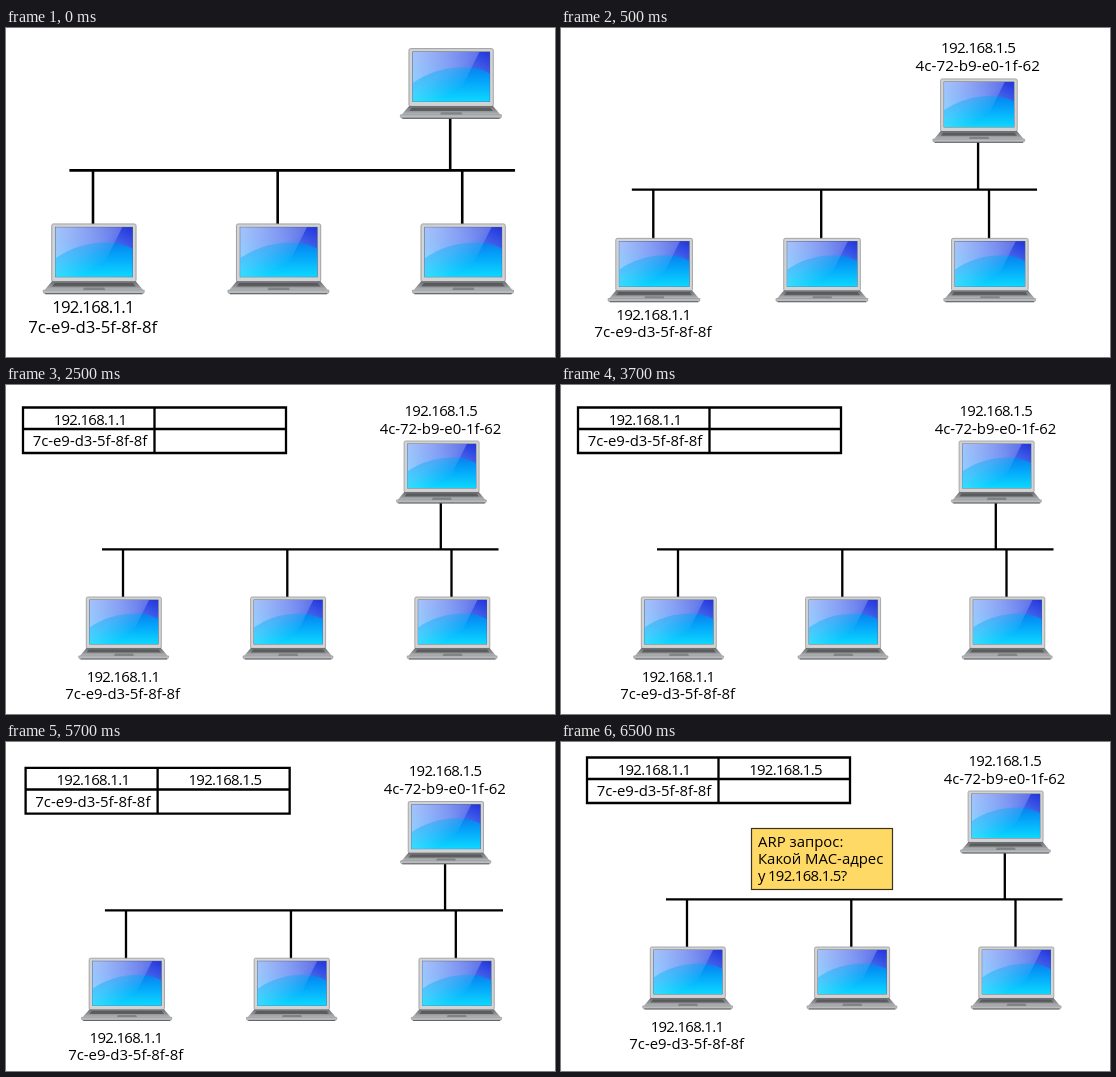
Recreate the animation shown at these times as an HTML page. Size 549 px wide and 329 px high, loop 8000 ms.

```html
<!DOCTYPE html>
<html lang="ru">
<head>
<meta charset="utf-8">
<title>ARP</title>
<style>
  html, body { margin: 0; width: 100%; height: 100%; overflow: hidden; background: #fff; }
  svg { display: block; width: 549px; height: 329px; }
  text { font: 14.9px "Open Sans", "Noto Sans", sans-serif; fill: #000; }
  .mid text { text-anchor: middle; }
  .ip { letter-spacing: -.045em; }
  .wire { fill: none; stroke: #000; stroke-width: 2.3; }
</style>
</head>
<body>
<svg viewBox="0 0 549 329">
  <defs>
    <linearGradient id="sky" x1="1" y1="0" x2=".3" y2=".8">
      <stop offset="0" stop-color="#2434dc"/>
      <stop offset=".45" stop-color="#4a70ee"/>
      <stop offset="1" stop-color="#5cb4ff"/>
    </linearGradient>
    <linearGradient id="sea" x1="0" y1="0" x2="0" y2="1">
      <stop offset="0" stop-color="#0a80ee"/>
      <stop offset=".4" stop-color="#04a4fa"/>
      <stop offset="1" stop-color="#0cd8ff"/>
    </linearGradient>
    <linearGradient id="shine" x1="0" y1="0" x2=".8" y2="1">
      <stop offset="0" stop-color="#fff" stop-opacity=".5"/>
      <stop offset=".5" stop-color="#fff" stop-opacity=".25"/>
      <stop offset=".8" stop-color="#fff" stop-opacity="0"/>
    </linearGradient>
    <linearGradient id="deck" x1="0" y1="0" x2="0" y2="1">
      <stop offset="0" stop-color="#6a6c6e"/>
      <stop offset=".5" stop-color="#8e9092"/>
      <stop offset="1" stop-color="#bfc0c2"/>
    </linearGradient>
    <!-- origin: top of the lid, on the cable -->
    <g id="laptop">
      <rect x="-36.7" y=".4" width="75" height="51.4" rx="1.5" fill="#d2d3d5" stroke="#96989b" stroke-width=".8"/>
      <rect x="-33.7" y="3" width="69.2" height="44.8" fill="#4c5868"/>
      <rect x="-33.3" y="3.4" width="68.4" height="44" fill="url(#sky)"/>
      <path d="M-33.3 31C-21 22 -4 17 11 17C21 17 29 19 35.1 22.5V47.4H-33.3Z" fill="url(#sea)"/>
      <path d="M-33.3 3.4H26L4 47.4H-33.3Z" fill="url(#shine)"/>
      <path d="M-36.5 51.4H38L45.2 59.8H-43.7Z" fill="url(#deck)"/>
      <path d="M-34 53H35.5L38 56H-36.5Z" fill="#4c4e50" opacity=".75"/>
      <path d="M-8 57H10L11 59.3H-9Z" fill="#808284"/>
      <path d="M-44.3 59.3H45.6V61Q45.6 62.4 43.5 62.4H-42Q-44.3 62.4-44.3 61Z" fill="#b9bbbd" stroke="#85878a" stroke-width=".5"/>
      <path d="M-42.5 62.4H44" stroke="#55585a" stroke-width=".9"/>
    </g>
  </defs>

  <g id="net" class="mid">
    <path class="wire" d="M-21 .3H375.5M0 0V49M164.3 0V49M328.5 0V49M317.8 0V-46"/>
    <use href="#laptop" y="47.6"/>
    <use href="#laptop" x="164.3" y="47.6"/>
    <use href="#laptop" x="328.5" y="47.6"/>
    <use href="#laptop" x="317.8" y="-108.4"/>
    <g id="label">
      <text class="ip">192.168.1.1</text>
      <text x="-.3" y="17.2">7c-e9-d3-5f-8f-8f</text>
    </g>
    <g data-from="1">
      <text class="ip" x="317.8" y="-133">192.168.1.5</text>
      <text x="317.5" y="-115.5">4c-72-b9-e0-1f-62</text>
    </g>
    <g data-from="2">
      <path class="wire" d="M-100-141.5H163V-96H-100ZM-100-120H163M31.5-141.5V-96"/>
      <text class="ip" x="-33" y="-124.5">192.168.1.1</text>
      <text x="-33" y="-103">7c-e9-d3-5f-8f-8f</text>
    </g>
    <text data-from="3" class="ip" x="98.5" y="-124.5">192.168.1.5</text>
  </g>
  <g data-from="4" transform="translate(190 86)">
    <rect x=".5" y=".5" width="141" height="61" fill="#ffd966" stroke="#3b3420" stroke-width="1.2"/>
    <text x="7" y="19">ARP запрос:</text>
    <text x="7" y="36">Какой MAC-адрес</text>
    <text class="ip" x="7" y="53">у 192.168.1.5?</text>
  </g>
</svg>
<script>
  const LOOP = 8000;
  // left cable joint (x, y), scale and label baseline of each view
  const views = [
    { at: 0,    x: 87,   y: 142,   s: 1.124, label: 127.5 },
    { at: 500,  x: 92.3, y: 161.3, s: 1.022, label: 127.5 },
    { at: 2500, x: 117,  y: 164,   s: 1,     label: 132.5 },
    { at: 4500, x: 120,  y: 168,   s: 1.004, label: 132.5 },
    { at: 6500, x: 126,  y: 157,   s: 1,     label: 132.5 }
  ];
  const net = document.getElementById("net");
  const label = document.getElementById("label");
  const parts = document.querySelectorAll("[data-from]");
  let shown = -1;

  function show(i) {
    const v = views[i];
    net.setAttribute("transform", `translate(${v.x} ${v.y}) scale(${v.s})`);
    label.setAttribute("transform", `translate(0 ${v.label})`);
    for (const p of parts) p.style.display = i >= p.dataset.from ? "" : "none";
    shown = i;
  }

  const start = performance.now();
  function tick(now) {
    const t = Math.max(0, now - start) % LOOP;
    const i = views.findLastIndex(v => t >= v.at);
    if (i !== shown) show(i);
    requestAnimationFrame(tick);
  }
  show(0);
  requestAnimationFrame(tick);
</script>
</body>
</html>
```
